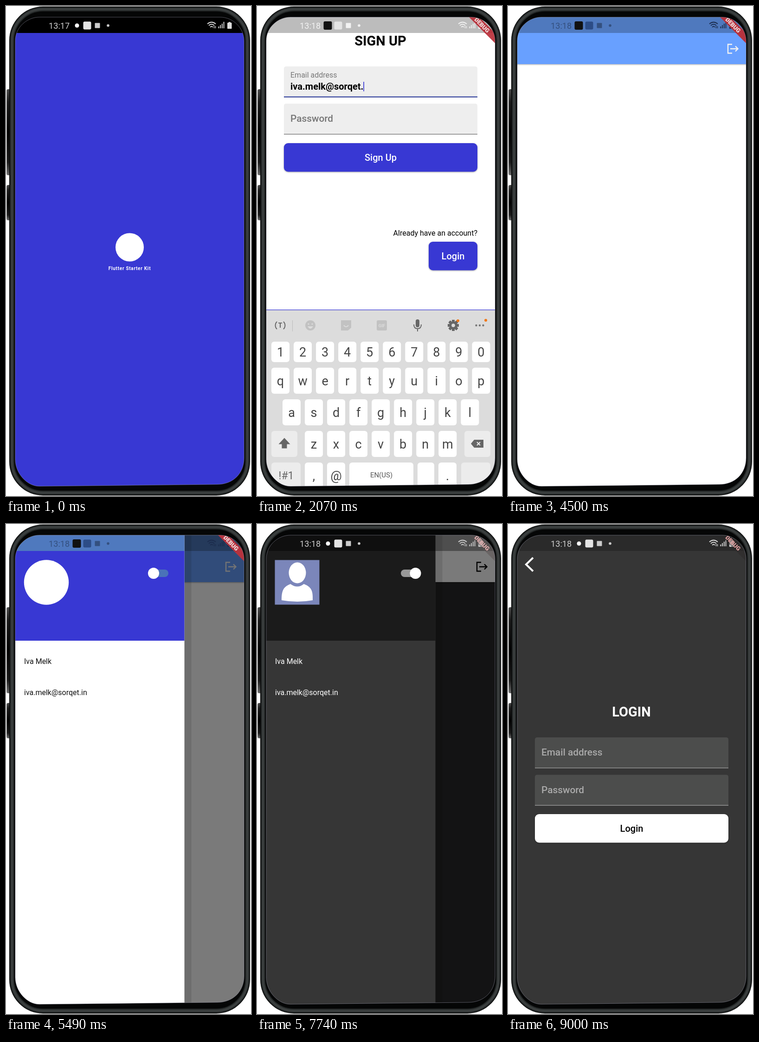
These frames come from a looping animation (528x1054 px, 9.72 s). An HTML page:

```html
<!DOCTYPE html>
<html lang="en">
<head>
<meta charset="utf-8">
<title>App walkthrough</title>
<style>
html, body { margin: 0; width: 100%; height: 100%; overflow: hidden; background: #fff; }
svg { display: block; width: 528px; height: 1054px; font-family: Roboto, "Noto Sans", sans-serif; }
.mid { text-anchor: middle; }
.end { text-anchor: end; }
.raised { filter: drop-shadow(0 1px 1.5px rgba(0, 0, 0, .35)); }
.typed { animation: typed 9720ms step-end infinite; }
@keyframes typed { 0% { font-size: 20px } 35% { font-size: 0 } 100% { font-size: 0 } }
</style>
</head>
<body>
<script>
const LOOP = 9720, TICK = 90;
const BLUE = '#3838d3';
const rules = [];

// Shape helpers
const rect = (x, y, w, h, fill, r = 0, extra = '') =>
  `<rect x="${x}" y="${y}" width="${w}" height="${h}" rx="${r}" fill="${fill}" ${extra}/>`;
const circle = (x, y, r, fill) => `<circle cx="${x}" cy="${y}" r="${r}" fill="${fill}"/>`;
const path = (d, fill) => `<path d="${d}" fill="${fill}"/>`;
const line = (d, stroke, w = 2) => `<path d="${d}" fill="none" stroke="${stroke}" stroke-width="${w}"/>`;
const text = (x, y, size, str, fill, cls = '', weight = 400, extra = '') =>
  `<text x="${x}" y="${y}" font-size="${size}" fill="${fill}" class="${cls}" font-weight="${weight}" ${extra}>${str}</text>`;
const group = (id, ...parts) => `<g id="${id}">${parts.join('')}</g>`;

// Held keys: each [ms, value] lasts until the next one
function animate(id, prop, keys) {
  const body = keys.map(([ms, v]) => `${(ms / LOOP * 100).toFixed(4)}%{${prop}:${v}}`).join('');
  const last = keys[keys.length - 1][1];
  rules.push(`@keyframes ${id}{${body}100%{${prop}:${last}}}
    #${id}{animation:${id} ${LOOP}ms step-end infinite}`);
}
const fade = (id, ...keys) => animate(id, 'opacity', keys);
const slide = (id, axis, ...keys) =>
  animate(id, 'transform', keys.map(([ms, v]) => [ms, `translate${axis}(${v}px)`]));

const typed = (str, start, step) => [...str].map((c, i) => {
  const at = Math.round((start + i * step) / TICK) * TICK;
  return `<tspan class="typed" style="animation-delay:${at - LOOP}ms">${c}</tspan>`;
}).join('');

function status(time, bg, fg, right, dark, tile = '#e4e4e4') {
  const bars = [4, 7, 10, 14].map((h, i) => rect(457.5 + i * 3.7, 48 - h, 1.8, h, right)).join('');
  return rect(18, 22, 498, 36, bg) + text(92, 48.5, 18.2, time, fg) +
    (dark ? circle(153, 42, 4.5, '#fff') : rect(143.5, 33, 18, 18, '#111', 3)) +
    rect(166.5, 33.5, 17, 17, tile, 3) + rect(191.5, 36.5, 11, 11, fg, 1) + circle(220, 42, 2.8, fg) +
    line('M434 38.5Q443 31 452 38.5M437 42Q443 36.5 449 42M440 45.5Q443 42.5 446 45.5', right, 1.8) +
    line('M448.5 48v-5M451.5 43v5', right, 1.3) + bars +
    rect(477, 36, 9.5, 13, right, 1) + rect(479.5, 34.5, 4.5, 2, right);
}

const banner = (fill, ink) => path('M457 24H479L513 58V80Z', fill) +
  text(0, 4.5, 12.5, 'DEBUG', ink, 'mid', 900, 'transform="translate(485 41) rotate(45)"');

const light = { bg: '#fff', field: '#eee', rule: '#777', btn: BLUE, btnInk: '#fff', ink: '#000', label: '#777' };
const dark = { bg: '#363636', field: '#4c4d4c', rule: '#999', btn: '#fff', btnInk: '#000', ink: '#fff', label: '#aaa' };

const button = (x, y, w, label, c) =>
  `<g class="raised">${rect(x, y, w, 61.5, c.btn, 9)}</g>` + text(x + w / 2, y + 37.5, 20, label, c.btnInk, 'mid', 500);

// A field with an id also has a floating label, typed value and focus state
function field(y, label, c, id, value) {
  const box = path(`M58 ${y + 66}V${y + 5}q0-5 5-5H470q5 0 5 5V${y + 66}Z`, c.field) +
    rect(58, y + 65, 417, 1.4, c.rule);
  const big = text(72, y + 39, 20.8, label, c.label, '', 500);
  if (!id) return box + big;
  return box + group(id + 'Big', big) + group(id + 'Small', text(72, y + 24, 16, label, c.label)) +
    text(72, y + 50, 20, value + `<tspan id="${id}Caret" font-weight="400" font-size="23" fill="${BLUE}" dx="-2">|</tspan>`, c.ink, '', 700) +
    group(id + 'Focus', rect(58, y + 64.5, 417, 2, '#2f3f9f'));
}

function focus(id, from, to) {
  fade(id + 'Big', [0, 1], [from, 0]);
  fade(id + 'Small', [0, 0], [from, 1]);
  fade(id + 'Caret', [0, 0], [from, 1], [to, 0]);
  fade(id + 'Focus', [0, 0], [from, 1], [to, 0]);
}

const signUp = (c, live) =>
  text(266, 308, 29, 'SIGN UP', c.ink, 'mid', 700) +
  field(353, 'Email address', c, live && 'email', typed('iva.melk@sorqet.in', 1350, 50)) +
  field(433, 'Password', c, live && 'pass', typed('••••••', 2430, 90)) +
  button(58, 518, 417, 'Sign Up', c) +
  text(475, 716.5, 16, 'Already have an account?', c.ink, 'end') +
  button(370, 730, 105, 'Login', c);

// Keyboard
const key = (x, y, w, label, h = 56, fill = '#fff') =>
  rect(x, y, w, h, fill, 6) + text(x + w / 2, y + h / 2 + 9.5, 27, label, '#444', 'mid');
const row = (x, y, chars, h) => [...chars].map((c, i) => key(x + i * 48.05, y, 39, c, h)).join('');

function tools(xs, micInk) {
  const [smile, sticker, gif, mic, gear] = xs, pale = '#c2c2c2', y = 687;
  const teeth = [...Array(8)].map((_, i) =>
    rect(gear - 3, y - 12, 6, 24, '#666', 1, `transform="rotate(${i * 45} ${gear} ${y})"`)).join('');
  return circle(smile, y, 11, pale) + circle(smile - 4, y - 3, 1.6, '#dcdcdc') + circle(smile + 4, y - 3, 1.6, '#dcdcdc') +
    path(`M${smile - 6} ${y + 2}h12q-6 10-12 0Z`, '#dcdcdc') +
    path(`M${sticker - 11} ${y - 11}h22v16l-7 6h-15Z`, pale) + line(`M${sticker - 5} ${y}q5 6 10 0`, '#dcdcdc') +
    rect(gif - 11, y - 11, 22, 22, pale, 3) + text(gif, y + 3.5, 9.5, 'GIF', '#dcdcdc', 'mid', 700) +
    rect(mic - 4, y - 13, 8, 17, micInk, 4) + line(`M${mic - 8} ${y - 2}q0 9 8 9q8 0 8-9M${mic} ${y + 7}v6`, micInk) +
    teeth + circle(gear, y, 8.5, '#666') + circle(gear, y, 3.8, '#dcdcdc') + circle(gear + 10, y - 10, 3, '#f07818') +
    [472.5, 480, 487.5].map(x => circle(x, y, 2.2, '#777')).join('') + circle(493, y - 11, 3, '#f07818');
}

const keyboard =
  rect(18, 653, 498, 400, '#dcdcdc') + rect(18, 653, 498, 1.2, BLUE) +
  row(31, 722, '1234567890', 44) + row(31, 778, 'qwertyuiop') + row(55, 846, 'asdfghjkl') + row(103, 914, 'zxcvbnm') +
  rect(31, 914, 56, 56, '#ececec', 6) + path('M59 929l12.500 13.500h-7v9h-11v-9h-7Z', '#666') +
  rect(447, 914, 56, 56, '#ececec', 6) + path('M461 941.500L468 933H488V950H468Z', '#666') +
  line('M474 938l7 7m0-7l-7 7', '#ececec') +
  key(31, 982, 63, '', 56, '#ececec') + text(63, 1018, 23, '!#1', '#666', 'mid') +
  key(103, 982, 39, ',') + key(391, 982, 39, '.') +
  group('mailKeys', tools([115, 192, 269, 346, 423], '#666'),
    text(50, 692, 14, 'T', '#666', 'mid', 700), line('M43 679a11 11 0 0 0 0 16M57 679a11 11 0 0 1 0 16', '#666'),
    rect(76, 676, 1, 24, '#bbb'),
    key(151, 982, 39, '@'), key(199, 982, 138, ''), text(268, 1014, 15, 'EN(US)', '#555', 'mid'),
    key(346, 982, 36, ''), key(440, 982, 63, '', 56, '#ececec')) +
  group('passKeys', tools([63, 152, 241, 330, 418], '#c2c2c2'),
    key(151, 982, 231, ''), text(267, 1016, 16, 'English (US)', '#555', 'mid'),
    key(440, 982, 63, '', 56, '#ececec'), text(471, 1016, 18, 'Done', BLUE, 'mid'));

// Home page with its drawer
function home(id, night) {
  const ink = night ? '#fff' : '#111', icon = night ? '#000' : '#f2f2f2';
  const avatar = night
    ? rect(38.5, 77.5, 96, 96, '#7b86ba') + '<ellipse cx="87" cy="105" rx="18.5" ry="22.5" fill="#fff"/>' +
      path('M53 164C53 141 58 135 72 129Q87 140 101 129C116 135 121 142 120 164Q87 170 53 164Z', '#fff')
    : circle(87, 125.5, 48.2, '#fff');
  const toggle = night
    ? rect(310, 98, 36, 16, '#999', 8) + circle(341.5, 106, 12, '#fff')
    : rect(314, 98, 36, 16, '#4a72b8', 8) + circle(318, 106, 12, '#fff');
  return group(id,
    rect(18, 22, 498, 1014, night ? '#29292a' : '#fff'),
    `<g class="raised">${rect(18, 58, 498, 67, night ? '#fff' : '#68a0ff')}</g>`,
    rect(18, 22, 498, 36, night ? '#a4a4a4' : '#4f79be'),
    line('M483 82.500H474V101.500H483M479 92H495M490 86.500L495.500 92L490 97.500', icon, 2.4),
    group(id + 'Scrim', rect(18, 22, 498, 1014, '#000', 0, 'opacity=".52"')),
    group(id + 'Drawer',
      rect(384.5, 22, 15, 1014, '#000', 0, 'opacity=".1"'),
      rect(18, 22, 366.5, 1014, night ? '#363636' : '#fff'),
      rect(18, 58, 366.5, 193, night ? '#1b1b1b' : BLUE),
      rect(18, 22, 366.5, 36, night ? '#0f0f0f' : '#4f79be'),
      avatar, toggle,
      text(39, 300.5, 16, 'Iva Melk', ink), text(39, 367.5, 16, 'iva.melk@sorqet.in', ink)),
    night ? status('13:18', 'none', '#ccc', '#ccc', true) : status('13:18', 'none', '#34507f', '#1c2c4c', false, '#2c4c86'),
    night ? banner('rgba(90,80,80,.5)', '#e8b4b4') : banner('#b5333f', '#f4e4e4'));
}

const page = fill => rect(18, 22, 498, 1014, fill);
const redBanner = banner('rgba(183,38,48,.88)', '#f4e4e4');
const nightBanner = banner('rgba(45,40,40,.5)', '#e8a5a5');
const nightStatus = status('13:18', '#2a2a2a', '#ccc', '#ddd', true);

const scenes =
  group('signup', page('#fff'), group('form', signUp(light, true)),
    group('gap', rect(18, 571, 498, 82, '#fff'), rect(18, 653, 498, 25, '#1c35cf'),
      `<g clip-path="url(#strip)">${text(266, 651, 17, 'Change language, typing and more in the setup', '#fff', 'mid')}</g>`),
    group('keys', group('keysFade', keyboard)),
    status('13:18', '#bcbcbc', '#f2f2f2', '#f2f2f2', false), redBanner) +
  home('day', false) + home('night', true) +
  group('signupNight', page('#363636'), signUp(dark), nightStatus, nightBanner) +
  group('login', page('#363636'),
    line('M54 72.500L39 87L54 101.500', '#fff', 4),
    text(266, 414, 29, 'LOGIN', '#fff', 'mid', 700),
    field(459, 'Email address', dark), field(539.5, 'Password', dark),
    button(58, 624, 417, 'Login', dark), nightStatus, nightBanner) +
  group('splash', page(BLUE), circle(266.5, 519, 30.5, '#fff'),
    text(266.5, 568, 10, 'Flutter Starter Kit', '#fff', 'mid', 700, 'letter-spacing=".7"'),
    status('13:17', '#000', '#ccc', '#ddd', true));

// Timeline
fade('splash', [0, 1], [630, 0]);
fade('signup', [0, 0], [630, 1], [4410, 0]);
slide('form', 'Y', [0, 0], [1170, -110], [1260, -223], [3420, -110], [3510, 0]);
fade('gap', [0, 0], [1080, 1], [1170, 0]);
slide('keys', 'Y', [0, 400], [990, 200], [1080, 24], [1170, 0], [3420, 150], [3510, 400]);
fade('keysFade', [0, .8], [1080, .93], [1170, 1]);
fade('mailKeys', [0, 1], [2340, 0]);
fade('passKeys', [0, 0], [2340, 1]);
focus('email', 990, 2340);
focus('pass', 2340, 3060);
fade('day', [0, 0], [4320, .5], [4410, 1], [7380, 0]);
fade('dayScrim', [0, 0], [5040, .35], [5130, .7], [5220, .9], [5310, 1]);
slide('dayDrawer', 'X', [0, -400], [5040, -250], [5130, -100], [5220, -25], [5310, 0]);
fade('night', [0, 0], [7200, .5], [7290, 1], [8460, 0]);
fade('nightScrim', [0, 1], [8010, .85], [8100, .35], [8190, 0]);
slide('nightDrawer', 'X', [0, 0], [8010, -60], [8100, -250], [8190, -400]);
fade('signupNight', [0, 0], [8370, .5], [8460, 1], [8820, 0]);
slide('login', 'X', [0, 528], [8640, 300], [8730, 90], [8820, 0]);

const SCREEN = 'M20 75C20 46 45 24 72 24H461C490 24 513 48 513 75V972C513 1005 490 1029 455 1029L72 1033C45 1033 20 1005 20 975Z';
const ring = (inset, color, w) => rect(7 + inset, 1 + inset, 519 - 2 * inset, 1052 - 2 * inset, 'none', 73 - inset,
  `stroke="${color}" stroke-width="${w}"`);

document.body.innerHTML = `<svg viewBox="0 0 528 1054">
  <defs>
    <clipPath id="screen"><path d="${SCREEN}"/></clipPath>
    <clipPath id="strip"><rect x="18" y="653" width="498" height="25"/></clipPath>
    <linearGradient id="side" x2="0" y2="1">
      <stop stop-color="#4a4a4a"/><stop offset=".15" stop-color="#1a1a1a"/><stop offset=".5" stop-color="#000"/>
      <stop offset=".85" stop-color="#1a1a1a"/><stop offset="1" stop-color="#6a6a6a"/>
    </linearGradient>
  </defs>
  ${rect(1.5, 179, 9, 185, 'url(#side)', 3)}${rect(1.5, 385, 9, 76, 'url(#side)', 3)}
  ${rect(7, 1, 519, 1052, '#050606', 73)}
  ${ring(6, '#1c1f1f', 9.5)}${ring(6, '#2c3030', 7)}${ring(6, '#3b3f3f', 3.5)}
  <g clip-path="url(#screen)">${scenes}</g>
  <path d="${SCREEN}" fill="none" stroke="#b4b4c8" stroke-opacity=".45"/>
</svg>`;
const sheet = document.createElement('style');
sheet.textContent = rules.join('\n');
document.head.append(sheet);
</script>
</body>
</html>
```
